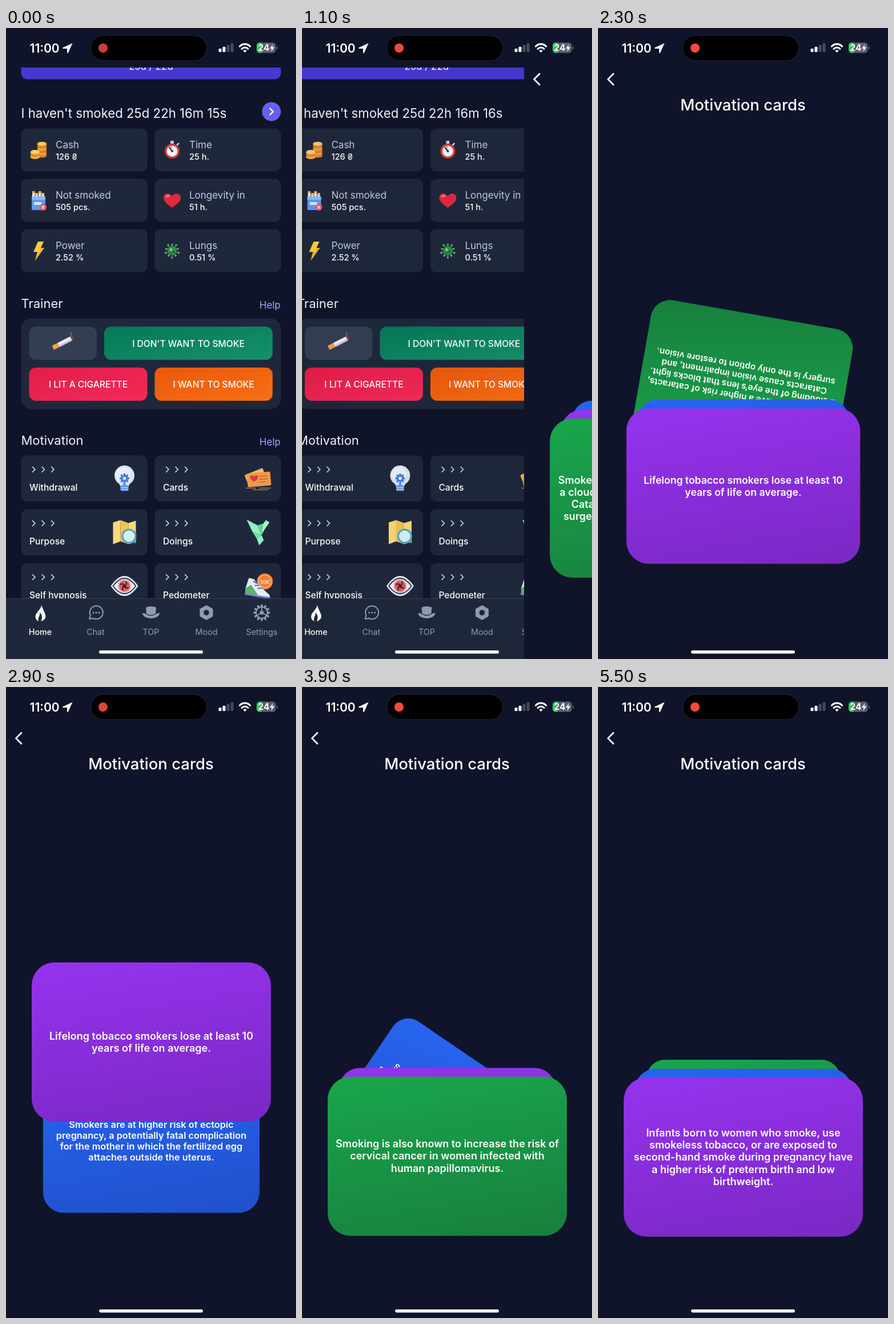
These frames come from a looping animation (508 by 1102 pixels, 5.6 s). An HTML page:

```html
<!DOCTYPE html>
<html lang="en">
<head>
<meta charset="utf-8">
<title>Motivation cards</title>
<style>
  html, body { margin: 0; width: 100%; height: 100%; overflow: hidden; background: #10142a; }
  #stage { position: relative; width: 508px; height: 1102px; overflow: hidden; font-family: Inter, "Open Sans", sans-serif; }
  .layer { position: absolute; inset: 0; width: 508px; height: 1102px; background: #10142a; }
  svg { display: block; }
  #dim { position: absolute; inset: 0; background: #000; }
  #system { background: none; z-index: 9; }
  .card {
    position: absolute; left: 45px; top: 682px; width: 419px; height: 278px; border-radius: 40px;
    display: flex; align-items: center; justify-content: center;
    color: #fff; font-weight: 600; font-size: 18px; line-height: 21.2px; text-align: center; white-space: pre;
  }
  .green { background: linear-gradient(170deg, #19a64c, #187f3e); }
  .purple { background: linear-gradient(170deg, #9533ee, #7a28c4); }
  .blue { background: linear-gradient(170deg, #2765f0, #2050cb); }
</style>
</head>
<body>
<div id="stage">
  <svg id="home" class="layer" viewBox="0 0 508 1102"></svg>
  <div id="dim"></div>
  <div id="page" class="layer">
    <svg width="508" height="200" style="position:absolute">
      <path d="M27 80L17.500 89.500L27 99" fill="none" stroke="#fff" stroke-width="2.800" stroke-linecap="round" stroke-linejoin="round"/>
      <text x="254" y="144" text-anchor="middle" font-size="27.500" font-weight="500" fill="#fff">Motivation cards</text>
    </svg>
    <div class="card green"></div>
    <div class="card purple"></div>
    <div class="card blue"></div>
  </div>
  <svg id="system" class="layer" viewBox="0 0 508 1102"></svg>
</div>
<script>
const LOOP = 5600, TICK = 500, PUSH = 1050;
const $ = id => document.getElementById(id);

// SVG helpers
const rect = (x, y, w, h, r, fill, more = '') =>
  `<rect x="${x}" y="${y}" width="${w}" height="${h}" rx="${r}" fill="${fill}" ${more}/>`;
const circle = (x, y, r, fill, more = '') => `<circle cx="${x}" cy="${y}" r="${r}" fill="${fill}" ${more}/>`;
const oval = (x, y, rx, ry, fill, more = '') => `<ellipse cx="${x}" cy="${y}" rx="${rx}" ry="${ry}" fill="${fill}" ${more}/>`;
const path = (d, fill, more = '') => `<path d="${d}" fill="${fill}" ${more}/>`;
const line = (d, color, w, more = '') =>
  path(d, 'none', `stroke="${color}" stroke-width="${w}" stroke-linecap="round" stroke-linejoin="round" ${more}`);
const text = (x, y, size, str, fill = '#fff', more = '') =>
  `<text x="${x}" y="${y}" font-size="${size}" fill="${fill}" ${more}>${str}</text>`;
const at = (x, y, body, more = '') => `<g transform="translate(${x} ${y}) ${more}">${body}</g>`;
const repeat = (n, fn) => Array.from({ length: n }, (_, i) => fn(i)).join('');
const spokes = (n, fn) => repeat(n, i => `<g transform="rotate(${i * 360 / n})">${fn(i)}</g>`);
const MID = 'text-anchor="middle"', END = 'text-anchor="end"', MEDIUM = 'font-weight="500"';
const PANEL = '#1f283b', GREY = '#929db3';

// Icons, each drawn around its own centre
const icons = {
  coins:
    repeat(6, i => oval(6, 10 - i * 4, 8.5, 3.6, i % 2 ? '#f0a23c' : '#d9822b')) + oval(6, -11, 8, 3.2, '#f9c860') +
    repeat(3, i => oval(-6, 12 - i * 4, 8.5, 4, i % 2 ? '#e08a2e' : '#f3aa42')) + oval(-6, 3.5, 7.5, 3.6, '#fbd06c'),
  watch:
    rect(-3, -16, 6, 5, 1, '#c9ced8') + line('M9 -9L11 -11', '#c9ced8', 3) +
    circle(0, 2, 13, '#d8393a') + circle(0, 2, 9.5, '#f2f4f7') +
    path('M0 2L-6 -5A9 9 0 0 1 0 -7Z', '#aab3c2') + line('M0 2L-5 -4', '#303848', 2) + circle(0, 2, 2, '#303848'),
  pack:
    repeat(4, i => rect(-11 + i * 5.5, -16 + (i % 2) * 3, 4.5, 14, 1, '#f4f1ee') + rect(-11 + i * 5.5, -16 + (i % 2) * 3, 4.5, 4, 1, '#f0b070')) +
    rect(-12, -7, 24, 24, 2, '#5f97f5') + rect(-12, -7, 24, 6, 1, '#8db8fb') + rect(-8, 3, 13, 5, 1, '#dce9ff') +
    circle(8, 12, 6, '#e5536b') + line('M6 10L10 14M10 10L6 14', '#fff', 1.5),
  heart:
    path('M0 13C-8 7 -15 2 -15 -5C-15 -13 -4 -14 0 -7C4 -14 15 -13 15 -5C15 2 8 7 0 13Z', '#e0293f') +
    path('M-12 -6C-11 -11 -5 -11 -3 -7C-6 -6 -8 -4 -12 -6Z', '#f5707c'),
  bolt: path('M-1 -16L9 -16L4 -5L10 -5L-6 17L-2 2L-9 2Z', '#f8cf3a') + path('M4 -5L10 -5L-6 17L-2 2L2 2Z', '#eeb62b'),
  virus:
    spokes(10, i => line('M0 -7V-11', '#3f9b57', 1.6) + circle(0, i % 2 ? -12 : -10.5, 1.8, '#58b66c')) +
    circle(0, 0, 8, '#348a4c') + circle(-2, -2, 2.4, '#7fd08c') + circle(3, 2, 2, '#1f6238') + circle(-2, 4, 1.4, '#1f6238'),
  cigarette:
    rect(-20, -4, 11, 8, 1.5, '#f2a04a') + rect(-9, -4, 25, 8, 0, '#f2e9f5') + rect(-9, 1, 25, 3, 0, '#cdbfd8') +
    rect(16, -4, 4, 8, 1, '#6b4a4a') + line('M18 -5L20 -9', '#c8663e', 1.5),
  bulb:
    circle(0, -5, 17.5, '#d9e2f3') + path('M-10 6H10L7 15H-7Z', '#d9e2f3') + circle(-2, -7, 13, '#e9eff9') +
    spokes(8, () => rect(-1.8, -8.5, 3.6, 5, 0.5, '#3f7be0')) + circle(0, 0, 6, '#3f7be0') + circle(0, 0, 2.8, '#e9eff9') +
    rect(-7, 12, 14, 10, 2, '#5a94ec') + line('M-6 16H6M-6 19.500H6', '#b8d2fa', 1.5) + rect(-2, 5, 4, 8, 0, '#5a94ec'),
  cards:
    `<g transform="rotate(-22)">${rect(-20, -14, 34, 22, 2, '#f5b566')}</g>` +
    `<g transform="rotate(-5)">${rect(-19, -10, 41, 24, 2, '#f0994c')}${line('M3 -3H16M3 2H16M3 7H12', '#b95f30', 1.3)}</g>` +
    at(-7, 0, path('M0 6C-4 3 -7 1 -7 -2C-7 -6 -2 -6 0 -3C2 -6 7 -6 7 -2C7 1 4 3 0 6Z', '#d83c45')) +
    line('M-21 17H-4M2 17H22M-9 20H17', '#d9a05b', 1),
  map:
    path('M-20 -17L-7 -21V16L-20 21Z', '#f9d978') + path('M-7 -21L7 -16V21L-7 16Z', '#f1c456') + path('M7 -16L20 -20V17L7 21Z', '#f9d978') +
    line('M13 12L19 18', '#3b9fb0', 3) + circle(8, 7, 13, '#48a9bd') + circle(8, 7, 10, '#d9eef7'),
  bird:
    path('M-20 -22L-1 -12L6 5L-10 -1Z', '#8ff0c0') + path('M-1 -12L9 -15L6 5Z', '#5fd39c') +
    path('M9 -15L14 -21L20 -17L11 -4L6 5Z', '#a5f7d0') + path('M-10 -1L6 5L-2 12Z', '#6fdfab') +
    path('M6 5L-2 12L2 23L10 14Z', '#8ff0c0'),
  eye:
    path('M-24 0Q0 -35 24 0Q0 35 -24 0Z', '#e9edf5') + line('M-20 0Q0 -27 20 0Q0 27 -20 0Z', '#26304a', 1.8) +
    circle(0, 0, 11, '#e4575b') + circle(0, 0, 10, 'none', 'stroke="#f5a09c" stroke-width="1.500"') +
    spokes(4, () => line('M0 0Q5 -2 3 -7', '#4a2438', 2.2)) + circle(0, 0, 2.5, '#2a1a2c'),
  shoe:
    circle(12, -8, 14, '#ee7d31') + circle(12, -8, 11, 'none', 'stroke="#ffc48e" stroke-width="1.200"') +
    text(12, -4, 9, '10K', '#ffe3c8', MID + ' font-weight="700"') +
    path('M-22 4L-16 -14L-7 -12L-2 -5L16 12Q22 16 20 20L-22 13Z', '#e5ebf2') + path('M-22 4L-12 -2L0 16L-22 13Z', '#56b66b') +
    line('M-8 -8L-2 -5M-5 -1L2 -1M0 4L7 4', '#4a6ab0', 2) + line('M-22 14Q0 18 20 21', '#6a7fd6', 3) + line('M-25 24H25', '#65a34a', 2)
};

const tabIcons = {
  Home: path('M1 -15C4 -9 -2 -6 -7 2C-11 9 -6 14 -3 15C-5 8 0 7 -1 0C4 4 4 10 1 15C9 13 11 7 8 1C5 -5 4 -9 1 -15Z', '#fff'),
  Chat: line('M-11 11L-9 5A11.500 11.500 0 1 1 -4 10Z', GREY, 2) + [-4, 1, 6].map(x => circle(x, 0, 1.6, GREY)).join(''),
  TOP: path('M-9 -9Q0 -13 9 -9L8 2Q0 6 -8 2Z', GREY) + path('M-8 3Q0 8 8 3Q12 0 15 1Q14 9 0 10Q-14 9 -15 1Q-12 0 -8 3Z', GREY),
  Mood: path('M0 -13L11.500 -6.500V6.500L0 13L-11.500 6.500V-6.500Z', GREY) + circle(0, 0, 4.8, PANEL),
  Settings: spokes(12, () => rect(-1.8, -14.5, 3.6, 5, 1, GREY)) + circle(0, 0, 10, 'none', `stroke="${GREY}" stroke-width="2"`) +
    spokes(3, () => line('M0 0V-9', GREY, 1.8)) + circle(0, 0, 3.5, GREY)
};

const stats = [
  ['coins', 'Cash', '126 ₴'], ['watch', 'Time', '25 h.'],
  ['pack', 'Not smoked', '505 pcs.'], ['heart', 'Longevity in', '51 h.'],
  ['bolt', 'Power', '2.52 %'], ['virus', 'Lungs', '0.51 %']
];
const topics = [
  ['bulb', 'Withdrawal'], ['cards', 'Cards'], ['map', 'Purpose'],
  ['bird', 'Doings'], ['eye', 'Self hypnosis'], ['shoe', 'Pedometer']
];
const column = i => i % 2 ? 260.5 : 26.5;

function stat([icon, label, value], i) {
  const x = column(i), y = 175.5 + (i >> 1) * 88;
  return rect(x, y, 221, 75, 11, PANEL) + at(x + 30.5, y + 37.5, icons[icon]) +
    text(x + 60.5, y + 34.5, 17, label, '#c3cbe4') + text(x + 60.5, y + 54, 14.6, value, '#fff', MEDIUM);
}

function topic([icon, label], i) {
  const x = column(i), y = 746.5 + (i >> 1) * 94;
  return rect(x, y, 221, 80.5, 11, PANEL) + at(x + 181, y + 40, icons[icon]) +
    repeat(3, j => line(`M${x + 20 + j * 16.5} ${y + 20}l4.500 4.500l-4.500 4.500`, '#e3e8f2', 1.5)) +
    text(x + 14.5, y + 61, 15.6, label, '#fff', MEDIUM);
}

function button(x, y, w, fill, label) {
  return rect(x, y, w, 58, 12, fill) + text(x + w / 2, y + 35, 15.6, label, '#fff', MID + ' ' + MEDIUM);
}

const gradient = (id, a, b) =>
  `<linearGradient id="${id}" x1="0" y1="0" x2="1" y2="1"><stop stop-color="${a}"/><stop offset="1" stop-color="${b}"/></linearGradient>`;
const heading = (y, label) => text(26.5, y, 22, label, '#f4f6fb') + text(481, y + 1, 17, 'Help', '#a3a5f7', END);

$('home').innerHTML =
  '<defs>' + gradient('calm', '#057857', '#14916a') + gradient('lit', '#e11d48', '#f42a58') + gradient('urge', '#ea580c', '#f96f14') +
  '<clipPath id="scroll"><path d="M0 69H508V996H0Z"/></clipPath></defs>' +
  '<g clip-path="url(#scroll)">' +
  rect(26.5, 40, 455, 49.5, 11, '#4937d2') + text(254, 73, 17, '25d / 22d', '#fff', MID) +
  text(26.5, 157, 22.2, '', '#f4f6fb', 'id="timer"') +
  circle(465, 146, 16.5, '#6461f1') + line('M462.500 140.500L468 146L462.500 151.500', '#fff', 2.4) +
  stats.map(stat).join('') +
  heading(489, 'Trainer') + rect(26.5, 507.5, 455, 158, 18, PANEL) +
  rect(40.5, 521.5, 118.5, 58, 12, '#343e53') + at(100, 549.5, icons.cigarette, 'rotate(-27)') +
  button(172, 521.5, 295, 'url(#calm)', 'I DON\'T WANT TO SMOKE') +
  button(40.5, 593, 207, 'url(#lit)', 'I LIT A CIGARETTE') +
  button(260.5, 593, 206.5, 'url(#urge)', 'I WANT TO SMOKE') +
  heading(728, 'Motivation') + topics.map(topic).join('') + '</g>' +
  rect(0, 996, 508, 106, 0, PANEL) + rect(0, 996, 508, 1, 0, '#343f55') +
  Object.entries(tabIcons).map(([label, icon], i) =>
    at(60 + i * 97, 1021, icon) + text(60 + i * 97, 1060, 14.3, label, i ? GREY : '#fff', MID + (i ? '' : ' ' + MEDIUM))).join('');

$('system').innerHTML =
  text(41.5, 42.5, 21, '11:00', '#fff', 'font-weight="600"') +
  path('M116.500 26.500L99 34.500Q98.500 35.800 100 36H107V43Q107.500 44.500 108.800 43.500Z', '#fff') +
  rect(148.500, 13, 203.500, 44, 22, '#000', 'stroke="#1a1e30" stroke-width="1.500"') +
  circle(170, 35, 8, '#f54a3c', 'id="dot"') +
  repeat(4, i => rect(372.500 + i * 7, 36 - i * 3.2, 5, 6 + i * 3.2, 1.4, i < 2 ? '#fff' : '#454a5c')) +
  line('M409.500 32A12.500 12.500 0 0 1 427.500 32', '#fff', 3.2, 'stroke-linecap="butt"') +
  line('M413 36.500A7.500 7.500 0 0 1 424 36.500', '#fff', 3, 'stroke-linecap="butt"') +
  path('M415.500 39.500Q418.500 37 421.500 39.500L418.500 43Z', '#fff') +
  '<clipPath id="cell"><rect x="439" y="25.500" width="33.500" height="18" rx="5.500"/></clipPath>' +
  `<g clip-path="url(#cell)">${rect(439, 25, 34, 19, 0, '#5b6070')}${rect(439, 25, 8.5, 19, 0, '#39c75b')}</g>` +
  rect(474, 32, 1.8, 5.5, 0.9, '#5b6070') +
  text(441.500, 40.300, 15.500, '24', '#fff', 'font-weight="700"') +
  path('M467.500 28.500L462 36H465.500L464.500 41.500L470.500 33.500H466.500Z', '#fff') +
  rect(163, 1087, 182, 5.5, 2.75, '#fff');

// Card deck
const texts = [
  'Smokers also have a higher risk of cataracts,\na clouding of the eye’s lens that blocks light.\nCataracts cause vision impairment, and\nsurgery is the only option to restore vision.',
  'Lifelong tobacco smokers lose at least 10\nyears of life on average.',
  'Smokers are at higher risk of ectopic\npregnancy, a potentially fatal complication\nfor the mother in which the fertilized egg\nattaches outside the uterus.',
  'Smoking is also known to increase the risk of\ncervical cancer in women infected with\nhuman papillomavirus.',
  'Infants born to women who smoke, use\nsmokeless tobacco, or are exposed to\nsecond-hand smoke during pregnancy have\na higher risk of preterm birth and low\nbirthweight.'
];
const cards = [...document.querySelectorAll('.card')];
const swipes = [ // release time and height reached
  { at: 2058, top: 566 }, { at: 2902, top: 620 }, { at: 3510, top: 600 }, { at: 4350, top: 638 }
];
const DRAG = 180, REST_Y = [821, 792.5, 763.5], SCALE = [1, 0.905, 0.81];

const mix = (a, b, p) => a + (b - a) * p;
const ease = x => {
  x = Math.min(1, Math.max(0, x));
  return x < 0.5 ? 2 * x * x : 1 - 2 * (1 - x) ** 2;
};

function place(card, y, scale, turn, z, index) {
  card.style.transform = `translateY(${y - 821}px) rotate(${turn}deg) scale(${scale})`;
  card.style.zIndex = z;
  const str = texts[index] || texts[index - 3];
  if (card.textContent !== str) card.textContent = str;
}

function drawDeck(t) {
  const k = Math.max(0, swipes.filter(s => t >= s.at - DRAG).length - 1);
  const { at, top } = swipes[k], u = t - at;
  const grow = ease((u - 60) / 280), move = ease((u - 130) / 312);
  for (const d of [1, 2]) {
    place(cards[(k + d) % 3], mix(REST_Y[d], REST_Y[d - 1], move), mix(SCALE[d], SCALE[d - 1], grow), 0, 4 - d, k + d);
  }
  const lifted = mix(REST_Y[0], top, ease((u + DRAG) / DRAG));
  place(cards[k % 3], mix(lifted, REST_Y[2], move), mix(1, SCALE[2], grow), -360 * ease(u / 500),
    u < 60 ? 4 : 1, u > 300 ? k + 3 : k);
}

function drawPush(t) {
  const w = Math.max(0, t - PUSH) * 0.018;
  const p = t > 1650 ? 1 : 1 - (1 + w) * Math.exp(-w);
  $('home').style.transform = `translateX(${-152 * p}px)`;
  $('dim').style.opacity = 0.1 * p;
  $('page').style.transform = `translateX(${508 * (1 - p)}px)`;
}

const start = performance.now();
function draw() {
  const t = (performance.now() - start) % LOOP;
  $('timer').textContent = `I haven't smoked 25d 22h 16m ${t < TICK ? 15 : 16}s`;
  $('dot').style.opacity = 0.93 - 0.09 * Math.cos((t - 60) / 1600 * 2 * Math.PI);
  drawPush(t);
  drawDeck(t);
  requestAnimationFrame(draw);
}
draw();
</script>
</body>
</html>
```
